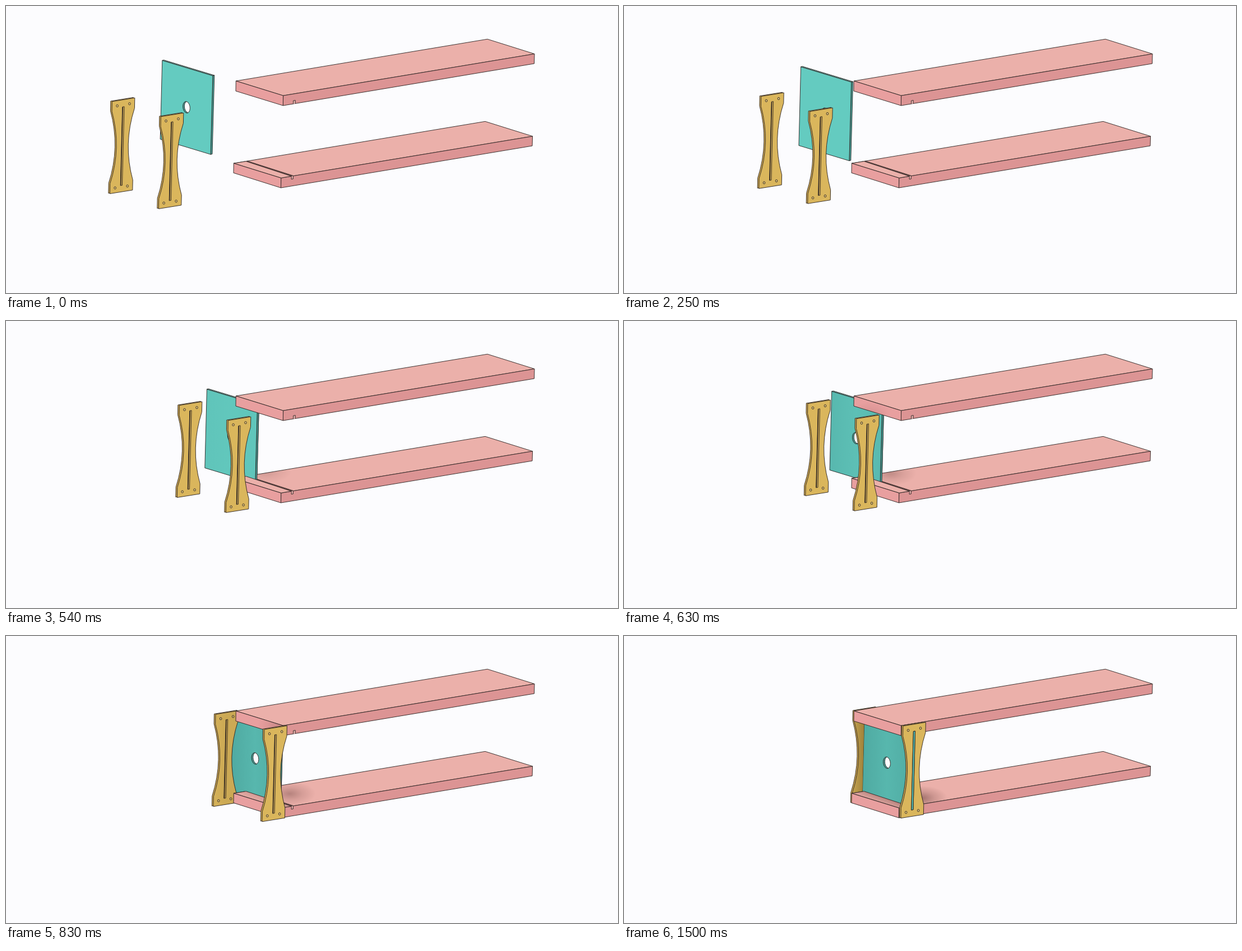
These frames come from a looping animation (1092x513 px, 2000 ms). An HTML page:

```html
<!DOCTYPE html>
<html lang="en">
<head>
<meta charset="utf-8">
<title>Shelf assembly</title>
<style>
  html, body { margin: 0; width: 100%; height: 100%; overflow: hidden; background: #fcfcfe; }
  svg { display: block; width: 100vw; height: 100vh; }
  .ink { stroke: #2b2322; stroke-width: .9; stroke-linejoin: round; }
  .top { fill: #ebb0aa; }
  .end { fill: #e89f9f; }
  .front { fill: #dc9494; }
  .shade { stroke: none; }
</style>
</head>
<body>
<svg viewBox="0 0 1092 513">
  <defs>
    <radialGradient id="soft">
      <stop offset="0" stop-color="#502c28" stop-opacity=".5"/>
      <stop offset=".5" stop-color="#502c28" stop-opacity=".2"/>
      <stop offset="1" stop-color="#502c28" stop-opacity="0"/>
    </radialGradient>
    <linearGradient id="panelTone">
      <stop offset="0" stop-color="#0a3c3c" stop-opacity=".24"/>
      <stop offset=".5" stop-color="#0a3c3c" stop-opacity=".14"/>
      <stop offset="1" stop-color="#0a3c3c" stop-opacity=".22"/>
    </linearGradient>
    <linearGradient id="plateTone">
      <stop offset="0" stop-color="#3c2800" stop-opacity=".12"/>
      <stop offset=".5" stop-color="#3c2800" stop-opacity=".38"/>
      <stop offset="1" stop-color="#3c2800" stop-opacity=".38"/>
    </linearGradient>
    <linearGradient id="stripTone" gradientUnits="userSpaceOnUse" x1="464" y1="303" x2="470" y2="287">
      <stop offset="0" stop-color="#502c28" stop-opacity=".06"/>
      <stop offset="1" stop-color="#502c28" stop-opacity=".4"/>
    </linearGradient>

    <path id="plateFace" d="M189.3 170.8L229.8 164.2L229.4 182.5Q208.6 247 226.2 311L225.8 329L185.3 335.5L185.7 317.5Q206.5 253 189 188.5Z"/>
    <path id="slot" d="M207.8 180.4L211 179.9L207.4 320.4L204.2 321Z"/>
    <g id="plate" class="ink">
      <use href="#plateFace" x="-2.5" y="-.8" fill="#cda751"/>
      <use href="#plateFace" fill="#dab65c"/>
      <use href="#slot" fill="#d0ab55"/>
      <path d="M208.3 180.8L204.8 320.6" stroke-width="1.3"/>
      <g fill="#e3c478">
        <ellipse cx="198.5" cy="178.5" rx="1.8" ry="2.1"/>
        <ellipse cx="220.5" cy="174.7" rx="1.8" ry="2.1"/>
        <ellipse cx="194.6" cy="325.2" rx="1.8" ry="2.1"/>
        <ellipse cx="216.6" cy="321.8" rx="1.8" ry="2.1"/>
      </g>
    </g>

    <path id="panelFace" d="M278.8 97.3L369 124.7L365.2 265.3L275.2 238Z"/>
    <circle id="bore" r="1" vector-effect="non-scaling-stroke"/>
    <clipPath id="boreClip"><circle r="1" transform="matrix(6.4 1.9 -.25 10.2 322 181)"/></clipPath>
    <g id="panel" class="ink">
      <path d="M278.8 97.3L281.5 96.5L371.8 123.9L369 124.7Z" fill="#7bd3ca"/>
      <path d="M369 124.7L371.8 123.9L368 264.6L365.2 265.3Z" fill="#48a49c"/>
      <use href="#panelFace" fill="#64cbc0"/>
      <use href="#panelFace" class="shade" id="panelShade" fill="url(#panelTone)"/>
      <circle r="1" transform="matrix(6.4 1.9 -.25 10.2 322 181)" fill="#479f97" stroke="none"/>
      <g clip-path="url(#boreClip)">
        <circle r="1" transform="matrix(6.4 1.9 -.25 10.2 324.7 180.5)" fill="#fcfcfe" vector-effect="non-scaling-stroke"/>
      </g>
      <circle r="1" transform="matrix(6.4 1.9 -.25 10.2 322 181)" fill="none" vector-effect="non-scaling-stroke"/>
    </g>

    <clipPath id="pastPlate"><path d="M429.4 143.5L432.4 26H800V400H422.8Z"/></clipPath>
    <clipPath id="lowerTop"><path d="M430 277L855 206L939.5 233L512 303.5Z"/></clipPath>
    <clipPath id="upperEnd"><path d="M410 134L494.5 160.2L494.3 178L410 152Z"/></clipPath>
  </defs>

  <rect width="1092" height="513" fill="#fcfcfe"/>
  <use href="#panel" class="slide"/>
  <g id="farPlate">
    <use href="#plate"/>
    <use href="#plateFace" id="farShade" fill="url(#plateTone)"/>
  </g>

  <g class="ink">
    <path class="top" d="M406.3 281.2L855 206.3L939.5 232.8L490.7 307.4Z"/>
    <path class="front" d="M490.7 307.4L939.5 232.8L939 250L490.5 325Z"/>
  </g>
  <g clip-path="url(#lowerTop)">
    <ellipse id="floorShade" rx="46" ry="22" fill="url(#soft)"/>
  </g>
  <path d="M428.5 277.6L430.8 277.2L512.6 303.4L510 304Z" fill="#b07470" class="ink"/>

  <g clip-path="url(#pastPlate)"><use href="#panel" class="slide"/></g>

  <g class="ink">
    <path class="top" d="M406.3 281.2L428.3 277.6L509.2 304.2L490.7 307.4Z"/>
    <path class="shade" id="stripShade" d="M406.3 281.2L428.3 277.6L509.2 304.2L490.7 307.4Z" fill="url(#stripTone)"/>
    <path class="end" d="M406.3 281.2L490.7 307.4L490.5 325L406 298.3Z"/>
    <path d="M509.2 304.2V309.6L512.4 309V303.6" fill="#eab5b0"/>
  </g>

  <g class="ink">
    <path class="top" d="M410.3 134L859 59.2L943 85.6L494.6 160.2Z"/>
    <path class="front" d="M494.6 160.2L943 85.6L942.5 103L494.4 178Z"/>
    <path class="end" d="M410.3 134L494.6 160.2L494.4 178L410 152Z"/>
    <path d="M512.7 175V169.2L516.2 168.6V174.4" fill="#eab5b0"/>
  </g>
  <g clip-path="url(#upperEnd)">
    <ellipse id="endShade" rx="36" ry="22" fill="url(#soft)"/>
  </g>

  <g id="nearPlate">
    <use href="#plate"/>
    <use href="#slot" id="tenon" class="ink" fill="#55b9af"/>
  </g>
</svg>
<script>
  const LOOP = 2000, STEPS = 24;
  const PLATE = [221.6, -36.9], PANEL = [147, 45.5];
  const byId = id => document.getElementById(id);
  const slides = document.querySelectorAll('.slide');
  const ramp = (p, from, to) => Math.min(1, Math.max(0, (p - from) / (to - from)));
  const move = (el, [dx, dy], p, x = 0, y = 0) =>
    el.setAttribute('transform', `translate(${x + dx * p} ${y + dy * p})`);
  const fade = (id, value) => byId(id).setAttribute('opacity', value);

  // 24 steps per second, each starting on a whole hundredth of a second
  function progress(t) {
    let k = STEPS;
    while (k > 0 && t < Math.round(k * 100 / STEPS) * 10) k--;
    return k / STEPS;
  }

  function draw(t) {
    const p = progress(t);
    move(byId('farPlate'), PLATE, p);
    move(byId('nearPlate'), PLATE, p, 87, 27);
    slides.forEach(el => move(el, PANEL, p));
    move(byId('floorShade'), PANEL, p, 384, 244);
    move(byId('endShade'), PLATE, p, 300, 190);

    fade('panelShade', ramp(p, .5, .72));
    fade('farShade', ramp(p, .78, 1));
    fade('floorShade', .55 * ramp(p, .4, .6) + .4 * ramp(p, .75, 1));
    fade('endShade', .6 * ramp(p, .55, .7) * (1 - ramp(p, .78, .92)));
    fade('stripShade', ramp(p, .65, 1));
    fade('tenon', p === 1 ? 1 : 0);
  }

  const start = performance.now();
  function tick() {
    draw((performance.now() - start) % LOOP);
    requestAnimationFrame(tick);
  }
  tick();
</script>
</body>
</html>
```
